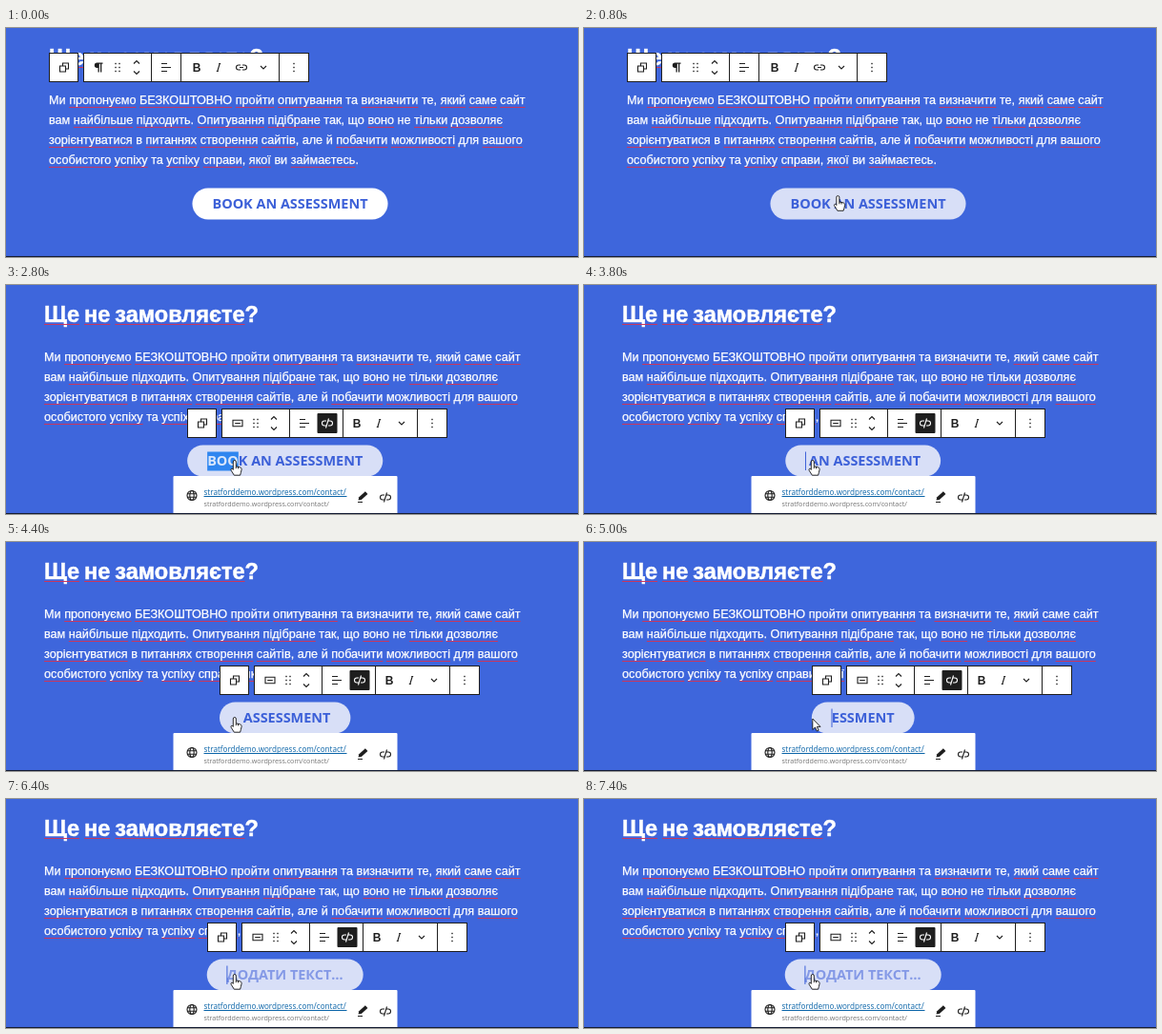
Write an HTML page that moves like this. It is 600 by 241 pixels and loops after 8 s.

```html
<!DOCTYPE html>
<html lang="uk">
<head>
<meta charset="utf-8">
<title>Button editing</title>
<style>
html, body { margin: 0; width: 100%; height: 100%; overflow: hidden; background: #3e66dc; }
svg { display: block; width: 600px; height: 241px; }
text { white-space: pre; }
.copy, .head { fill: #fff; stroke: #fff; }
.copy { font: 12.66px "Liberation Sans", Arial, sans-serif; stroke-width: .25; }
.head { font: bold 23.5px "Liberation Sans", Arial, sans-serif; stroke-width: .5; word-spacing: -1.5px; }
.label { font: bold 14.44px "Open Sans", "Noto Sans", sans-serif; }
.link { font: 8.12px "Open Sans", "Noto Sans", sans-serif; }
.bold { font: bold 12px "Liberation Sans", Arial, sans-serif; }
.line { fill: none; stroke: #1e1e1e; stroke-width: 1.1; }
.on .line { stroke: #fff; }
</style>
</head>
<body>
<svg id="stage" viewBox="0 0 600 241">
  <rect width="600" height="241" fill="#3e66dc"/>
  <g id="page"></g>
  <rect id="pill" y="168.5" height="33" rx="16.5"/>
  <rect id="mark" y="175.5" height="20" fill="#2f86f0"/>
  <text id="label" class="label" y="190.2"></text>
  <rect id="caret" y="175.5" width="1" height="19.5" fill="#3c60d8"/>
  <g id="textBar"></g>
  <g id="buttonBar"></g>
  <g id="popover"></g>
  <rect y="240" width="600" height="1" fill="#141c33"/>
  <g id="pointer" stroke="#111" stroke-width=".9" stroke-linejoin="round" fill="#fff">
    <path id="hand" d="M-1.5 1.2a1.5 1.5 0 0 1 3 0V6l4.3 1.1c1.2.4 1.6 1 1.5 2.3L6.6 12.6 5.8 15.4H-.5L-3.6 10.4c-.8-1.4.4-2.4 1.5-1.6l.6.8zM1.5 6v2.4M3.7 6.6v2"/>
    <path id="arrow" d="M0 0V11.5L2.7 9 4.4 13 6.3 12.2 4.6 8.4H8.2Z"/>
    <path id="beam" d="M-2-6h4M0-6V6M-2 6h4" fill="none"/>
  </g>
  <circle id="click" cx="234.5" cy="183" fill="#ffe838"/>
</svg>
<script>
const $ = id => document.getElementById(id);
const set = (el, attrs) => { for (const k in attrs) el.setAttribute(k, attrs[k]); };
const show = (el, on) => set(el, { visibility: on ? 'visible' : 'hidden' });
const add = (parent, tag, attrs, text = '') => {
  const el = document.createElementNS('http://www.w3.org/2000/svg', tag);
  set(el, attrs);
  el.textContent = text;
  parent.append(el);
  return el;
};

const LOOP = 8000, TICK = 200;
const FULL = 'BOOK AN ASSESSMENT', HINT = 'ДОДАТИ ТЕКСТ…';
const CUTS = [3, 4, 5, 6, 7, 8, 9, 11, 12, 13, 15, 16, 17, 18];
const COPY = [
  'Ми пропонуємо БЕЗКОШТОВНО пройти опитування та визначити те, який саме сайт',
  'вам найбільше підходить. Опитування підібране так, що воно не тільки дозволяє',
  'зорієнтуватися в питаннях створення сайтів, але й побачити можливості для вашого',
  'особистого успіху та успіху справи, якої ви займаєтесь.'
];

// Text with spelling marks under words of at least `min` letters
function proof(cls, str, y, gap, min) {
  const t = add($('page'), 'text', { class: cls, x: 40, y }, str);
  for (const m of str.matchAll(/\p{L}+/gu)) {
    if (m[0].length < min) continue;
    add($('page'), 'rect', {
      x: t.getStartPositionOfChar(m.index).x, y: Math.round(y + gap),
      width: t.getSubStringLength(m.index, m[0].length), height: 1,
      fill: '#c8375f'
    });
  }
}

const dots = (xs, ys) => xs.map(x => ys.map(y =>
  `<rect x="${x - .7}" y="${y - .7}" width="1.4" height="1.4"/>`).join('')).join('');
const chain = 'M-1-2.5H-3a2.5 2.5 0 0 0 0 5H-1M1-2.5H3a2.5 2.5 0 0 1 0 5H1';
const stroke = d => `<path class="line" d="${d}"/>`;
const ICONS = {
  block: stroke('M-4.5-1.5h6v6h-6zM-1.5-1.5v-3h6v6h-3'),
  para: '<path d="M1-5H-1.5a2.7 2.7 0 0 0 0 5.4H-.5V5H.8V-3.8H2V5H3.3V-3.8H4.5V-5z"/>',
  button: stroke('M-5-3.2H5V3.2H-5zM-2.8 0h5.6'),
  drag: dots([-2, 2], [-4, 0, 4]),
  move: stroke('M-3-4L0-7 3-4M-3 4L0 7 3 4'),
  align: stroke('M-5-4H1M-5 0H5M-5 4H1'),
  bold: '<text class="bold" x="-4.3" y="4.3">B</text>',
  italic: stroke('M.2-4h2M-2.2 4h2M1.2-4L-1.2 4'),
  link: stroke(chain + 'M-2 0H2'),
  unlink: stroke(chain + 'M1.5-5L-1.5 5'),
  more: stroke('M-3-1.5L0 1.5 3-1.5'),
  menu: dots([0], [-4, 0, 4])
};
const icon = (name, x, y = 0, on = false) =>
  `<g class="${on ? 'on' : ''}" transform="translate(${x} ${y})" fill="#1e1e1e">${ICONS[name]}</g>`;

function bar(el, items, rules, active) {
  let s = '<g fill="#fff" stroke="#1e1e1e"><rect x=".5" y="-15" width="30" height="30"/>' +
    '<rect x="36.5" y="-15" width="236" height="30"/></g>';
  for (const x of rules) s += `<path d="M${x}-15V15" stroke="#1e1e1e"/>`;
  if (active) {
    const x = items[active] - 10.5;
    s += `<rect x="${x}" y="-10.5" width="21" height="21" rx="1" fill="#1e1e1e"/>`;
  }
  for (const name in items) s += icon(name, items[name], 0, name === active);
  el.innerHTML = s;
}

function build() {
  proof('head', 'Ще не замовляєте?', 39, 2.4, 2);
  COPY.forEach((s, i) => proof('copy', s, 80 + i * 20.9, 3, 4));
  bar($('textBar'), { block: 16, para: 52, drag: 72, move: 92, align: 123, bold: 155,
    italic: 178, link: 202, more: 225, menu: 257 }, [107.5, 138.5, 241.5]);
  set($('textBar'), { transform: 'translate(45 41.5)' });
  bar($('buttonBar'), { block: 16, button: 53, drag: 72, move: 91, align: 123, unlink: 147,
    bold: 178, italic: 201, more: 225, menu: 257 }, [107.5, 163.5, 241.5], 'unlink');

  const url = 'stratforddemo.wordpress.com/contact/';
  $('popover').innerHTML =
    '<rect x="175.5" y="201" width="235" height="40" rx="1" fill="#fff"/>' +
    '<g class="line" transform="translate(195 221.5)"><circle r="5"/><ellipse rx="2.2" ry="5"/>' +
    '<path d="M-5-1.8H5M-5 1.8H5"/></g>' +
    `<text class="link" x="207.5" y="221" fill="#0a64a8">${url}</text>` +
    '<path d="M207.5 222.5H357.5" stroke="#0a64a8"/>' +
    `<text class="link" x="207.5" y="233" fill="#757575" style="font-size:7.15px">${url}</text>` +
    '<path d="M369.5 226.5l.8-3.2 6.6-6 2.5 2.6-6.6 6z" fill="#1e1e1e"/>' +
    '<path d="M369 228.5h5" stroke="#1e1e1e"/>' + icon('unlink', 398, 223.5);
}

// Pointer place and kind at a step
function pointerAt(n) {
  if (n < 7) {
    const p = 1 - (1 - n / 6) ** 2;
    return [525 - 291 * p, 112 + 73 * p, n < 4 ? 'beam' : 'hand'];
  }
  if (n < 10) return [235, 184, 'hand'];
  if (n < 14) return [[243, 186], [236, 186], [226.5, 182.5], [233, 184]][n - 10].concat('hand');
  return n > 24 && n < 32 ? [239.8, 186, 'arrow'] : [239.8, 184.8, 'hand'];
}

function draw(n) {
  const editing = n >= 10;
  const cut = n < 18 ? 0 : CUTS[Math.min(n - 18, CUTS.length - 1)];
  const empty = cut === FULL.length;
  const str = (empty ? HINT : FULL.slice(cut)).replace(/ /g, '\u00a0');
  const mid = editing ? 292.7 : 298;
  set($('page'), { transform: `translate(${editing ? 0 : 5} 0)` });

  const label = $('label');
  label.textContent = str;
  const w = label.getComputedTextLength(), x = mid - w / 2, left = x - 21;
  set(label, { x, fill: empty ? '#8499e6' : '#3c60d8' });
  set($('pill'), { x: left, width: w + 42, fill: n < 4 ? '#fff' : '#d8dff7' });

  const from = n === 11 ? 1 : 0, marked = n >= 11 && n < 18;
  show($('mark'), marked);
  if (marked) {
    const a = from ? label.getSubStringLength(0, from) : 0;
    set($('mark'), { x: x + a, width: label.getSubStringLength(0, 3) - a });
    label.textContent = str.slice(0, from);
    add(label, 'tspan', { fill: '#d8e6fb' }, str.slice(from, 3));
    label.append(str.slice(3));
  }
  show($('caret'), n >= 18 && n !== 22 && (n < 35 || n >= 37));
  set($('caret'), { x: x - .3 });

  show($('textBar'), !editing);
  show($('buttonBar'), editing);
  show($('popover'), editing);
  set($('buttonBar'), { transform: `translate(${Math.round(left)} 145.5)` });

  const [px, py, kind] = pointerAt(n);
  set($('pointer'), { transform: `translate(${px} ${py})` });
  for (const k of ['hand', 'arrow', 'beam']) show($(k), n > 0 && k === kind);
  set($('click'), { r: n === 8 ? 14 : n === 9 ? 20 : 0 });
}

build();
const start = performance.now();
let last = -1;
function frame(now) {
  const n = Math.floor(Math.max(0, now - start) % LOOP / TICK);
  if (n !== last) draw(last = n);
  requestAnimationFrame(frame);
}
draw(last = 0);
requestAnimationFrame(frame);
</script>
</body>
</html>
```
